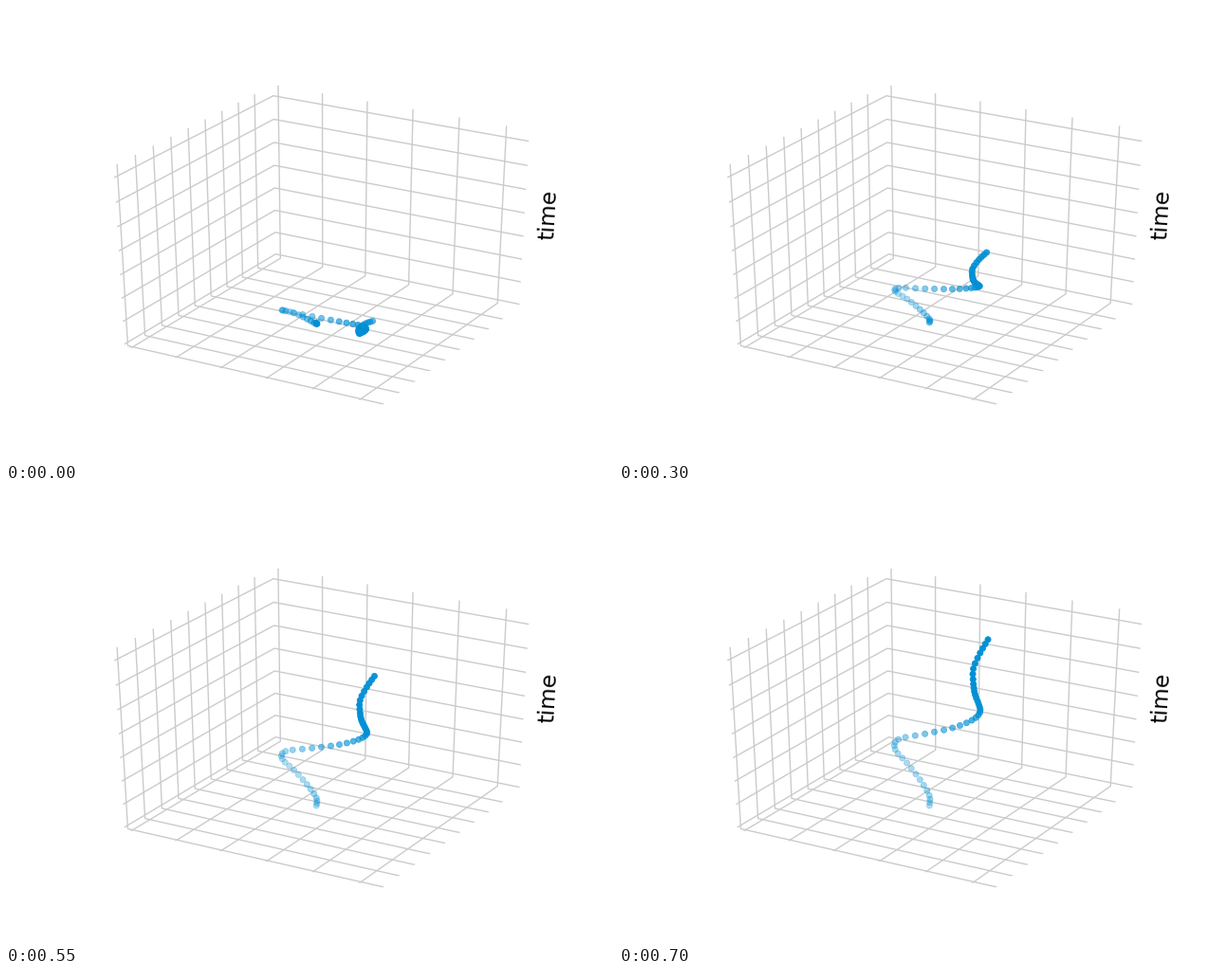
Write a matplotlib script that moves like this. It is 640 by 480 pixels and loops after 1.75 s.

```python
import numpy as np
import matplotlib.pyplot as plt
from matplotlib.animation import FuncAnimation
from matplotlib.collections import LineCollection

W, H, DPI = 640, 480, 100
STEP_MS, FRAMES, LAST = 50, 35, 14     # rises for 14 steps, then holds
DOTS = 46
BLUE, GRID = (0, 143 / 255, 213 / 255), "#cbcbcb"

# Camera: distance 10, elevation 30, azimuth -60, view window of 0.185 units
DIST = 10
SIN, COS = 0.5, np.sqrt(3) / 2
SX, SY = 0.87 * W / 0.185, 0.81 * H / 0.185
CX = 0.08 * W + 0.095 * SX
CY = 0.93 * H - 0.095 * SY
LOW, HIGH = -0.5 - 1 / 48, 0.5 + 1 / 48
FLOOR, RISE = -0.5, 0.957


def project(side, deep, z):
    """Screen position and view depth of a point in camera ground axes."""
    depth = DIST + COS * deep - SIN * z
    x = CX + SX * side / depth
    y = CY - SY * (SIN * deep + COS * z) / depth
    return x, y, depth


def unproject(px, py, z):
    """Ground axes of a screen point whose height is known."""
    b = (CY - py) / SY
    deep = (b * (DIST - SIN * z) - COS * z) / (SIN - COS * b)
    side = (px - CX) / SX * (DIST + COS * deep - SIN * z)
    return side, deep


def corner(x, y, z):
    return project(COS * x + SIN * y, COS * y - SIN * x, z)[:2]


def grid_lines():
    lines = []
    for x in -0.5 + 0.1853 * np.arange(6):
        lines.append([corner(x, LOW, LOW), corner(x, HIGH, LOW), corner(x, HIGH, HIGH)])
    for y in -0.5 + 0.1113 * np.arange(9):
        lines.append([corner(HIGH, y, LOW), corner(LOW, y, LOW), corner(LOW, y, HIGH)])
    for z in FLOOR + RISE / 7 * np.arange(8):
        lines.append([corner(LOW, LOW, z), corner(LOW, HIGH, z), corner(HIGH, HIGH, z)])
    return lines


def smooth_path(keys, n):
    """n points, evenly spaced in time, on a Catmull-Rom curve through keys."""
    slope = np.gradient(keys, axis=0)
    t = np.linspace(0, len(keys) - 1, n)
    i = np.minimum(t.astype(int), len(keys) - 2)
    s = (t - i)[:, None]
    ease = s * s * (3 - 2 * s)
    return (keys[i] * (1 - ease) + keys[i + 1] * ease
            + slope[i] * s * (1 - s) ** 2 - slope[i + 1] * s * s * (1 - s))


# Key points of the fully raised track, on screen
keys = np.array([
    (327.3, 334), (327.2, 323.3), (317.3, 306.6), (303.6, 289),
    (291.2, 274.7), (294.6, 264.2), (322.6, 258.3), (351.6, 252),
    (372, 244), (380.6, 235.6), (379.2, 227), (375.5, 217),
    (373.7, 205.8), (373.6, 189.6), (380.8, 173), (389, 158.8),
])
height = RISE * np.linspace(0, 1, DOTS) ** 0.97
side, deep = unproject(*smooth_path(keys, DOTS).T, FLOOR + height)

fig = plt.figure(figsize=(W / DPI, H / DPI), dpi=DPI, facecolor="white")
ax = fig.add_axes([0, 0, 1, 1])
ax.set(xlim=(0, W), ylim=(H, 0))
ax.axis("off")

# The three axis lines are white and trim the grid's ends
tip = corner(HIGH, LOW, LOW)
axis_lines = [[corner(LOW, LOW, LOW), tip], [tip, corner(HIGH, HIGH, LOW)],
              [corner(HIGH, HIGH, LOW), corner(HIGH, HIGH, HIGH)]]
ax.add_collection(LineCollection(grid_lines(), colors=GRID, linewidths=1))
ax.add_collection(LineCollection(axis_lines, colors="white", linewidths=2))

ax.text(572.5, 220, "time", rotation=86.7, rotation_mode="anchor",
        ha="center", va="center", fontsize=16.8, family="DejaVu Sans", color="black")
dots = ax.scatter([], [], s=20, linewidths=0.5, zorder=3)


def update(frame):
    lift = min(frame, LAST) / LAST
    x, y, depth = project(side, deep, FLOOR + height * lift)
    far = -1 / depth
    alpha = 1 - 0.7 * (far - far.min()) / np.ptp(far)
    order = np.argsort(-depth)
    rgba = np.column_stack([np.tile(BLUE, (DOTS, 1)), alpha])[order]
    dots.set_offsets(np.column_stack([x, y])[order])
    dots.set_facecolor(rgba)
    dots.set_edgecolor(rgba)
    return [dots]


anim = FuncAnimation(fig, update, frames=FRAMES, interval=STEP_MS,
                     repeat=True, repeat_delay=0, blit=False)
plt.show()
```
